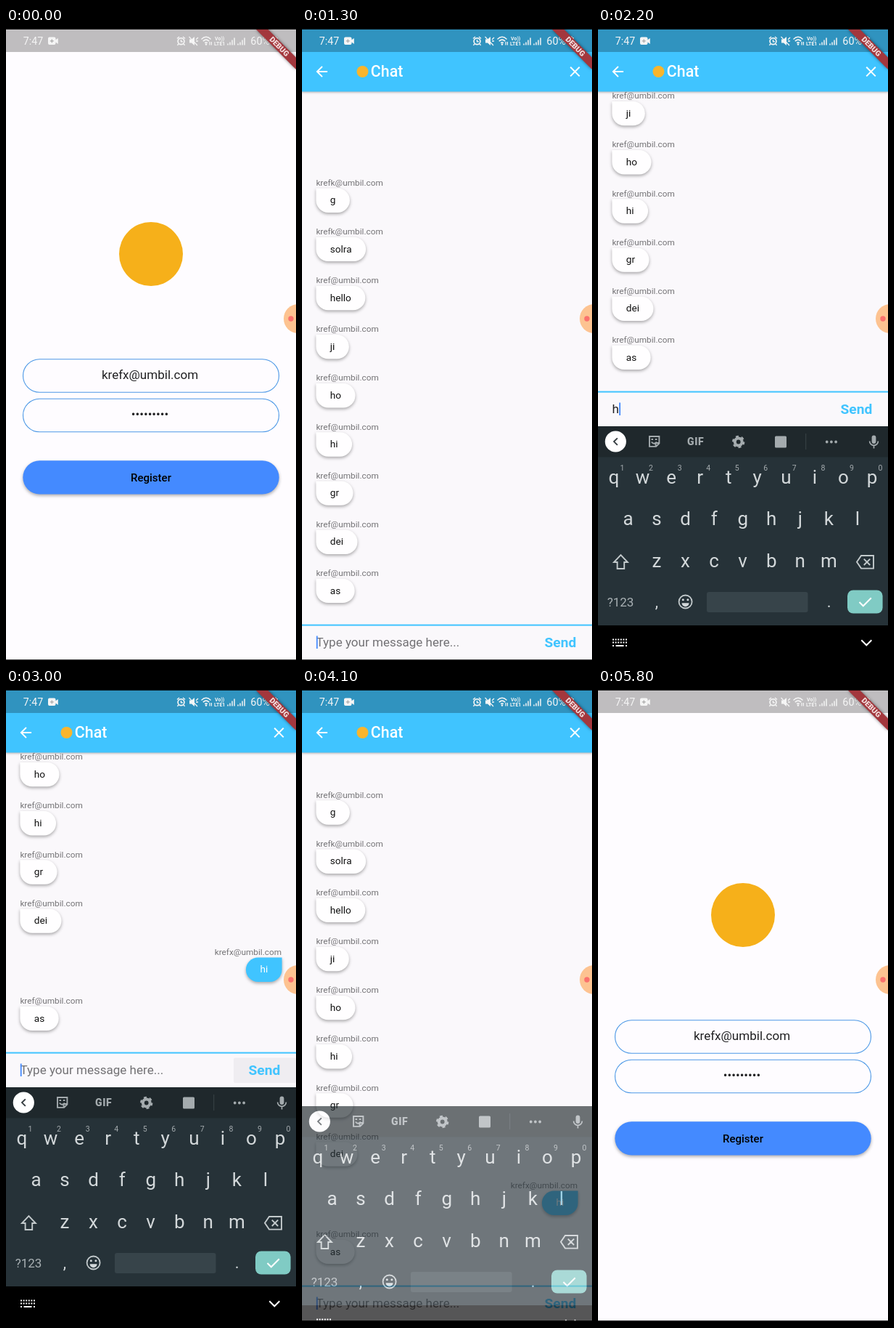
Recreate the animation shown at these times as an HTML page. Size 400 by 871 pixels, loop 6400 ms.

```html
<!DOCTYPE html>
<html lang="en">
<head>
<meta charset="utf-8">
<title>Chat app</title>
<style>
  html, body { margin: 0; width: 100%; height: 100%; overflow: hidden; background: #000; }
  svg { display: block; width: 100vw; height: 100vh; font-family: Roboto, sans-serif; }
  .mid { text-anchor: middle; }
  .line { fill: none; stroke: currentColor; }
  .raised { filter: drop-shadow(0 2.5px 2px rgba(0, 0, 0, .33)); }
  .label { font-size: 11.8px; fill: #757477; }
  .body { font-size: 17.05px; }
  #keyboard { color: #c3cacc; fill: #d3d8da; }
</style>
</head>
<body>
<svg viewBox="0 0 400 871">
  <defs><clipPath id="screen"><path d="M0 2H400V869H0z"/></clipPath></defs>
  <rect width="400" height="871"/>
  <g clip-path="url(#screen)">

    <g id="login">
      <rect width="400" height="871" fill="#fefcff"/>
      <circle cx="200" cy="311" r="44" fill="#f6b01a"/>
      <g fill="none" stroke="#4c98e6" stroke-width="1.1">
        <rect x="23.5" y="455.7" width="353" height="45.6" rx="22.8"/>
        <rect x="23.5" y="510.2" width="353" height="45.6" rx="22.8"/>
      </g>
      <text class="mid body" x="198.5" y="482.7" fill="#202022">krefx@umbil.com</text>
      <text class="mid body" x="198.5" y="537" fill="#202022">•••••••••</text>
      <rect class="raised" x="23.3" y="595.3" width="353.4" height="46.2" rx="23.1" fill="#448aff"/>
      <text class="mid" x="200" y="623.5" font-size="15" font-weight="500">Register</text>
    </g>

    <g id="chat">
      <rect width="400" height="871" fill="#faf8fb"/>
      <g id="content">
        <g id="older"></g>
        <g id="sent"></g>
        <g id="latest"></g>
        <rect y="820.6" width="400" height="2" fill="#40c4ff"/>
        <rect id="press" x="314" y="828.5" width="86" height="34.5" rx="2" fill="#efedf1"/>
        <text id="hint" class="body" x="19.5" y="851" fill="#727174">Type your message here...</text>
        <text id="typed" class="body" x="19.5" y="851" fill="#202022"></text>
        <rect id="cursor" y="836.5" width="1.8" height="17.5" fill="#448aff"/>
        <text x="334.5" y="852" font-size="19.2" font-weight="700" fill="#40c4ff">Send</text>
      </g>
      <rect y="-10" width="400" height="97.5" fill="#40c4ff" style="filter:drop-shadow(0 1.5px 1.5px rgba(0,0,0,.3))"/>
      <g fill="#fff">
        <path transform="translate(15.6 48.4) scale(.972)" d="M20 11H7.83l5.59-5.59L12 4l-8 8 8 8 1.41-1.41L7.83 13H20z"/>
        <path class="line" color="#fff" stroke-width="2" d="M370.2 53.8l12.6 12.6m0-12.6l-12.6 12.6"/>
        <text x="94.8" y="67.4" font-size="21.4" font-weight="500">Chat</text>
      </g>
      <circle cx="83.5" cy="60" r="8" fill="#f9b52c"/>
    </g>

    <g id="keyboard">
      <rect y="548" width="400" height="274" fill="#263238"/>
      <rect y="548" width="400" height="42.5" fill="#1f282c"/>
      <rect y="822" width="400" height="49" fill="#000"/>
      <g id="toolbar" class="tools" color="#a4abae" fill="#a4abae">
        <circle cx="24.3" cy="569" r="14.6" fill="#fff"/>
        <path class="line" color="#333b3f" stroke-width="1.9" d="M26.8 564.3l-4.8 4.8 4.8 4.8"/>
        <path class="line" stroke-width="1.9" d="M71 562h13.4v9.5l-4.3 4.4H71zM84 571h-4.4v4.6M73.8 569.5q3.4 4.5 7 0"/>
        <path d="M73.5 565h2.6v2h-2.6zm5.3 0h2.6v2h-2.6z"/>
        <text class="mid" x="134.7" y="574" font-size="14" font-weight="900" letter-spacing=".6">GIF</text>
        <circle class="line" cx="193.7" cy="569.5" r="4.9" stroke-width="4"/>
        <circle class="line" cx="193.7" cy="569.5" r="7.4" stroke-width="2.6" stroke-dasharray="3.875"/>
        <rect x="244" y="561.5" width="16" height="16" rx="1.5"/>
        <path class="line" color="#3b4448" d="M286.7 558v22"/>
        <path class="line" stroke-width="3.8" stroke-linecap="round" stroke-dasharray="0 6.2" d="M315.7 569.5h13"/>
        <rect x="377.6" y="560.5" width="5.8" height="11.5" rx="2.9"/>
        <path class="line" stroke-width="1.7" d="M374.6 568.5a5.9 5.9 0 0 0 11.8 0M380.5 574.5v4"/>
      </g>
      <g id="numbers" class="mid" font-size="24"></g>
      <g id="keys" class="mid" font-size="26"></g>
      <g id="superscripts" class="mid" font-size="10.5" fill="#a4abae"></g>
      <path class="line" stroke-width="1.9" d="M31.4 725.2l-9.4 9.8h4.6v9h9.6v-9h4.6z"/>
      <path class="line" stroke-width="1.9" d="M363 726h17v17.6h-17l-6-8.8zm3.8 4.6l8.4 8.4m0-8.4l-8.4 8.4"/>
      <text class="mid" x="31" y="796" font-size="17" fill="#a9b1b4">?123</text>
      <text class="mid" x="81" y="797" font-size="22">,</text>
      <text class="mid" x="318.6" y="797" font-size="22">.</text>
      <g id="smiley">
        <circle class="line" cx="120.6" cy="789.5" r="9" stroke-width="1.8"/>
        <circle cx="117.3" cy="786.8" r="1.5"/><circle cx="123.9" cy="786.8" r="1.5"/>
        <path d="M115.6 791.3h10a5 5 0 0 1-10 0z"/>
      </g>
      <rect id="space" y="776" height="28" rx="3" fill="#37444a"/>
      <rect x="344" y="773.5" width="48.6" height="32" rx="8" fill="#80cbc4"/>
      <path id="action" class="line" stroke-width="2"/>
      <g color="#fff">
        <path class="line" stroke-width="2" stroke-dasharray="2 1.6" d="M20 841.5h20M20 845.5h20"/>
        <path class="line" stroke-width="2" d="M20 850h2m2.5 0h11m2.5 0h2"/>
        <path class="line" stroke-width="2" d="M363.3 842.3l7 7 7-7"/>
      </g>
    </g>

    <circle cx="403" cy="400" r="20" fill="#fdc391"/>
    <circle cx="393" cy="400" r="3.7" fill="#fb716d"/>

    <g id="status" fill="#f5f5f5" color="#f5f5f5">
      <rect y="2" width="400" height="31" fill="#000" opacity=".25"/>
      <text x="23.8" y="23" font-size="14.2">7:47</text>
      <path d="M60 12.5h6.5q2 0 2 2v1.8l3.3-2.4v8l-3.3-2.4v1.6q0 2-2 2H60q-2 0-2-2v-6.6q0-2 2-2z"/>
      <path d="M60.8 17.8h5m-2.5-2.4v4.8" stroke="#aaa" stroke-width="1.2"/>
      <circle class="line" cx="241.5" cy="18.3" r="4.4" stroke-width="1.7"/>
      <path class="line" stroke-width="1.4" d="M236 14.5l3-2.5m8 2.5l-3-2.5m-2.5 4v2.7h2.3M238 22l-1.6 1.8m8.6-1.8l1.6 1.8"/>
      <path d="M253 15.5h3l4-3.5v12l-4-3.5h-3z"/>
      <path class="line" stroke-width="1.3" d="M252.5 12l11.5 12M262 16l3-3m-3 5h3"/>
      <path class="line" stroke-width="1.5" d="M269.5 15.5q6.5-6.4 13 0m-10.7 2.6q4.2-4 8.4 0m-6 2.5q1.8-1.8 3.6 0"/>
      <circle cx="276" cy="22.5" r="1.3"/>
      <path class="line" stroke-width="1.2" d="M281 19v4.6m2.4-4.6v4.6"/>
      <g font-size="7" font-weight="700"><text x="288" y="17">Vo))</text><text x="287" y="23.7">LTE1</text></g>
      <path class="line" stroke-width="1.5" d="M306 23.5v-2m3 2v-4m3 4v-7m3 7v-10M320 23.5v-2m3 2v-4m3 4v-7m3 7v-10"/>
      <text x="337.3" y="23.3" font-size="14.4">60%</text>
      <path d="M367.5 13h2v-1.5h3.4V13h2v11h-7.4z"/>
      <path d="M345 2h16.5L400 40.5V57z" fill="#a3373d" style="filter:drop-shadow(0 0 2px rgba(0,0,0,.5))"/>
      <text class="mid" transform="translate(374.4 28) rotate(45)" font-size="10.4" font-weight="900" fill="#f3dede">DEBUG</text>
    </g>
  </g>
</svg>
<script>
const LOOP = 6400, STEP = 100, ROW = 67.15, KEYBOARD_HEIGHT = 321;
const $ = id => document.getElementById(id);

function add(parent, tag, attrs, text = '') {
  const node = document.createElementNS(parent.namespaceURI, tag);
  for (const name in attrs) node.setAttribute(name, attrs[name]);
  node.textContent = text;
  return parent.appendChild(node);
}

// y is the middle of the sender label
function addMessage(parent, y, sender, text, own = false) {
  const r = 16.7, edge = own ? 380.6 : 19.4, pad = own ? -19.4 : 19.4;
  const anchor = own ? 'end' : 'start';
  add(parent, 'text', { class: 'label', x: own ? 380 : 19.4, y: y + 4, 'text-anchor': anchor }, sender + '@umbil.com');
  const bubble = add(parent, 'path', { class: 'raised', fill: own ? '#40c4ff' : '#fffeff' });
  const label = add(parent, 'text', { x: edge + pad, y: y + 28.6, 'font-size': 13.6, 'text-anchor': anchor, fill: own ? '#fff' : '#111' }, text);
  const width = label.getComputedTextLength() + 38.9;
  const side = own ? -1 : 1, sweep = own ? 0 : 1;
  bubble.setAttribute('d', `M${edge} ${y + 7.7}h${side * (width - r)}a${r} ${r} 0 0 ${sweep} 0 ${2 * r}` +
    `h${-side * (width - 2 * r)}a${r} ${r} 0 0 ${sweep} ${-side * r} ${-r}z`);
}

const history = ['g', 'solra', 'hello', 'ji', 'ho', 'hi', 'gr', 'dei'];
history.forEach((text, i) => addMessage($('older'), 750 - ROW * (8 - i), i < 2 ? 'krefk' : 'kref', text));
addMessage($('sent'), 750 - ROW, 'krefx', 'hi', true);
addMessage($('latest'), 750, 'kref', 'as');

function addKeys(parent, letters, x, y) {
  [...letters].forEach((letter, i) => add(parent, 'text', { x: x + 39.55 * i, y }, letter));
}
addKeys($('keys'), 'qwertyuiop', 22, 627);
addKeys($('keys'), 'asdfghjkl', 41.5, 684);
addKeys($('keys'), 'zxcvbnm', 81, 741.5);
addKeys($('numbers'), '1234567890', 22, 579);
addKeys($('superscripts'), '1234567890', 33.5, 608.5);

const show = (id, on) => $(id).setAttribute('visibility', on ? 'inherit' : 'hidden');
const moveY = (id, y) => $(id).setAttribute('transform', `translate(0 ${y})`);
const within = (t, from, to) => t >= from && t < to;

function chatProgress(t) {
  if (t < 200) return t < 100 ? 0 : .6;
  return Math.min(1, Math.max(0, 1 - (t - 5300) / 500));
}

function keyboardPose(t) {
  if (t < 1900) {
    const u = Math.max(0, (t - 1500) / 400);
    return { y: 110 * (1 - u), opacity: Math.min(1, 1.24 * u) };
  }
  const u = Math.min(1, Math.max(0, (4200 - t) / 200));
  return { y: 52 * (1 - u), opacity: Math.min(1, 1.3 * u) };
}

function draw(t) {
  const page = chatProgress(t);
  $('chat').setAttribute('opacity', page ** 2);
  moveY('chat', 218 * (1 - page) ** 2);

  const lifted = within(t, 1900, 4000), sent = t >= 2900;
  moveY('content', lifted ? -KEYBOARD_HEIGHT : 0);
  moveY('older', sent ? -ROW : 0);
  // the older rows are laid out directly above the latest one
  show('sent', sent);
  show('press', within(t, 2700, 3200));

  const typed = within(t, 2200, 2900) ? 'hi'.slice(0, t < 2400 ? 1 : 2) : '';
  $('typed').textContent = typed;
  show('hint', !typed);
  $('cursor').setAttribute('x', 19.8 + (typed ? $('typed').getComputedTextLength() : 0));
  show('cursor', t >= 1300 && !within(t, 3600, 4100) && !within(t, 4600, 5100));

  const pose = keyboardPose(t), numeric = t < 1900;
  $('keyboard').setAttribute('opacity', pose.opacity);
  moveY('keyboard', pose.y);
  show('numbers', numeric);
  for (const id of ['toolbar', 'superscripts', 'smiley']) show(id, !numeric);
  $('space').setAttribute('x', numeric ? 110 : 150);
  $('space').setAttribute('width', numeric ? 179.5 : 139.5);
  $('action').setAttribute('d', numeric ? 'M361.3 786.5l7 7 7-7' : 'M360.5 790l5.3 5.3 11-11');
  $('action').setAttribute('color', numeric ? '#263238' : '#fff');
}

function tick() {
  const t = performance.now() % LOOP;
  draw(Math.floor(t / STEP) * STEP);
  requestAnimationFrame(tick);
}
tick();
</script>
</body>
</html>
```
